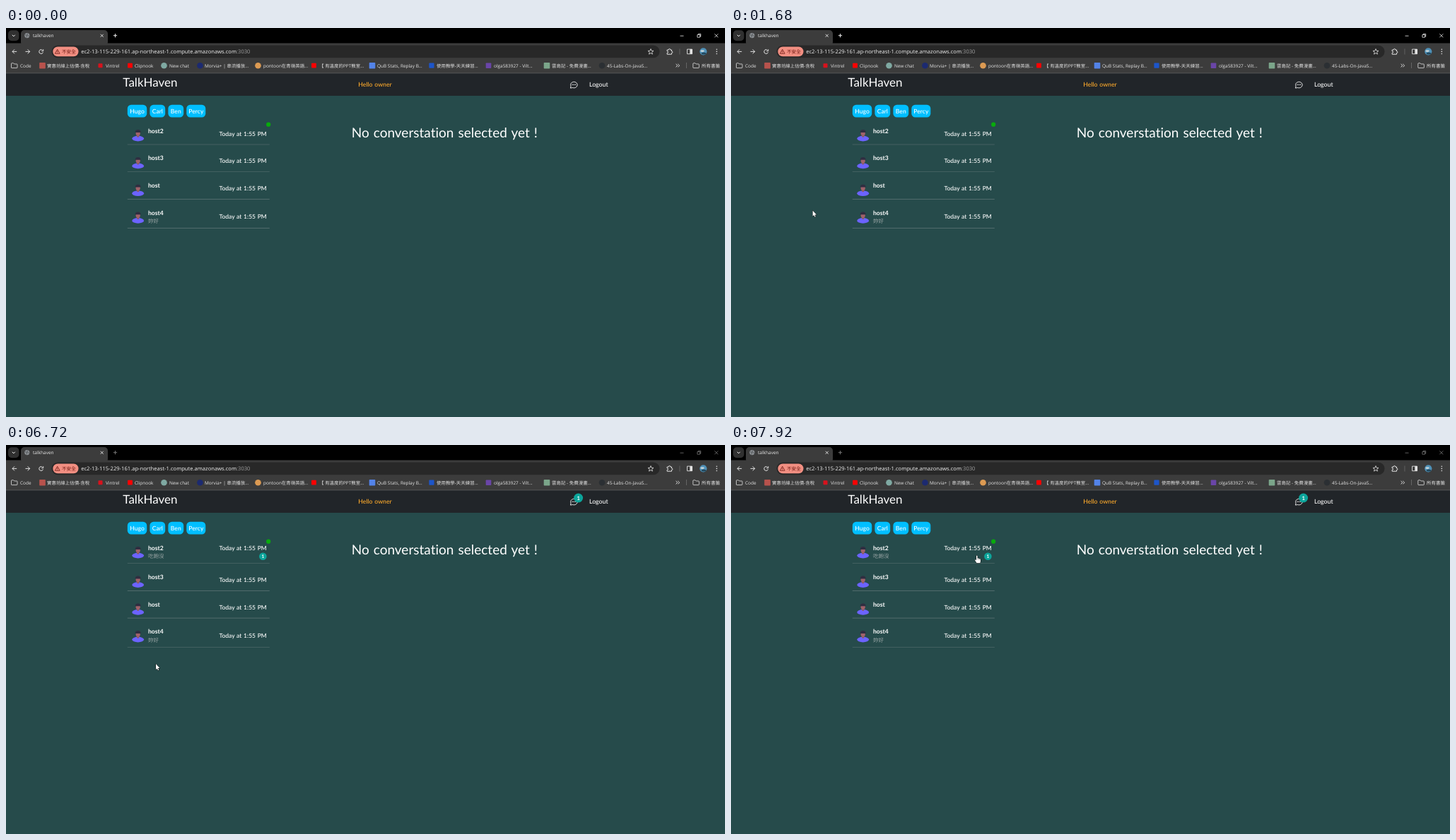
Animation, 1017 px wide and 551 px high, one loop 8000 ms. Source, as an HTML page with a canvas:

```html
<!DOCTYPE html>
<html lang="zh-Hant">
<head>
<meta charset="utf-8">
<title>talkhaven</title>
<style>
  html, body { margin: 0; width: 100%; height: 100%; overflow: hidden; background: #264b4b; }
  canvas { display: block; width: 1017px; height: 551px; }
</style>
</head>
<body>
<canvas id="stage"></canvas>
<script>
const W = 1017, H = 551, LOOP = 8000;
const UI = '"Open Sans", "Noto Sans CJK TC", "Noto Sans CJK", sans-serif';
const PAGE = 'Lato, "Noto Sans CJK TC", "Noto Sans CJK", sans-serif';
const BAR = '#3c3c3c', ICON = '#e3e3e3';

const stage = document.getElementById('stage');
const dpr = window.devicePixelRatio || 1;
stage.width = W * dpr;
stage.height = H * dpr;
const c = stage.getContext('2d');
c.scale(dpr, dpr);
c.textRendering = 'geometricPrecision';
c.letterSpacing = '0.01px'; // turns ligatures off

// ---- drawing helpers ----
function rect(x, y, w, h, color, r = 0) {
  c.fillStyle = color;
  c.beginPath();
  c.roundRect(x, y, w, h, r);
  c.fill();
}
function disc(x, y, r, color, ry = r) {
  c.fillStyle = color;
  c.beginPath();
  c.ellipse(x, y, r, ry, 0, 0, Math.PI * 2);
  c.fill();
}
function ring(x, y, r, color, from = 0, to = Math.PI * 2, width = 0.8) {
  c.strokeStyle = color;
  c.lineWidth = width;
  c.beginPath();
  c.arc(x, y, r, from, to);
  c.stroke();
}
function stroke(d, x, y, color, width = 0.9) {
  c.save();
  c.translate(x, y);
  c.strokeStyle = color;
  c.lineWidth = width;
  c.stroke(new Path2D(d));
  c.restore();
}
function text(s, x, y, size, color, font = PAGE, { weight = 400, align = 'left' } = {}) {
  c.font = `${weight} ${size}px ${font}`;
  c.wordSpacing = font === PAGE ? size * 0.06 + 'px' : '0px';
  c.textAlign = align;
  c.fillStyle = color;
  c.fillText(s, x, y);
}

// ---- browser ----
const marks = [
  [51.5, '#b8524c', 'square', 58, '實惠坊線上估價-含稅'],
  [133.5, '#d8121c', 'square', 141, 'Vintrel', 3],
  [175.5, '#f00', 'square', 182, 'Clipnook', 3.4],
  [223.5, '#7fa9a2', 'circle', 231, 'New chat'],
  [274.5, '#1c2a70', 'circle', 281, 'Morvia+ | 串流播放...'],
  [356.5, '#dc9a52', 'circle', 364, 'pontoon在青嶺英語...'],
  [435.5, '#f00', 'square', 443, '【 有溫度的PPT教室...', 3.4],
  [518, '#5383e8', 'square', 525, 'QuB Stats, Replay B...'],
  [602, '#1d55c9', 'square', 609, '使用教學-天天練習...', 3.6],
  [682.5, '#6a45a8', 'square', 690, 'olga583927 - Vilt...', 3.8],
  [765, '#7ba58a', 'square', 772, '雲島記 - 免費漫畫...'],
  [843, '#2b2f33', 'circle', 850, '45-Labs-On-JavaS...']
];

function folder(x, y) {
  stroke('M.5 1.5Q.5.8 1.2.8H3.6L4.8 2H8.2Q9 2 9 2.7V7Q9 7.6 8.2 7.6H1.2Q.5 7.6.5 7Z', x, y, ICON, 0.8);
}

function tabStrip(active) {
  const edge = active ? '#eee' : '#777';
  rect(0, 0, W, 22, '#000');
  rect(3, 3.3, 15.5, 15, '#303030', 5);
  stroke('M-2 -1L0 1L2 -1', 10.8, 10.8, '#fff', 1);
  rect(21, 3, 123, 22, BAR, 5);
  disc(29.8, 10.6, 3.6, '#8b8f93');
  stroke('M-3 -1L0 0L-1 3M1 -3L0 -1L3 1', 29.8, 10.6, '#4a4d50', 0.8);
  text('talkhaven', 38, 13.2, 6.5, '#e8e8e8', UI);
  stroke('M-2 -2L2 2M2 -2L-2 2', 135.7, 10.8, '#e8e8e8');
  stroke('M-2.6 0H2.6M0 -2.6V2.6', 154.5, 10.7, edge, 1);
  stroke('M-2.5 0H2.5', 956, 11.2, edge, 0.8);
  stroke('M-2.4 -1.2H1.2V2.4H-2.4ZM-1.2 -1.4V-2.4H2.4V1.2H1.4', 980.3, 10.8, edge, 0.8);
  stroke('M-2.5 -2.5L2.5 2.5M2.5 -2.5L-2.5 2.5', 1004.8, 10.8, edge, 0.8);
}

function toolbar() {
  rect(0, 21.6, W, 43, BAR);
  stroke('M3.2 0H-3M0 -3L-3 0L0 3', 12, 33.4, ICON, 1);
  stroke('M-3.2 0H3M0 -3L3 0L0 3', 30.7, 33.4, ICON, 1);
  ring(49.7, 33.5, 2.9, ICON, 0.3, 5.4, 1);
  stroke('M3 -3.3V-.8H.5', 49.7, 33.5, ICON, 1);

  rect(64.5, 24.5, 860, 17.8, '#282828', 8.9);
  rect(66.3, 26.6, 36.2, 13.6, '#f28f82', 6.8);
  stroke('M0 -3L3.4 3H-3.4ZM0 -.9V1.1M0 1.6V2.3', 72.7, 33.2, '#701a14', 0.8);
  text('不安全', 79, 36, 6.6, '#701a14', UI);
  const host = 'ec2-13-115-229-161.ap-northeast-1.compute.amazonaws.com';
  text(host, 106.2, 36, 7.6, '#f1f1f1', UI);
  text(':3030', 106.2 + c.measureText(host).width, 36, 7.6, '#a0a0a0', UI);

  let star = '';
  for (let i = 0; i < 10; i++) {
    const r = i % 2 ? 1.8 : 4.2, a = i * Math.PI / 5;
    star += (i ? 'L' : 'M') + r * Math.sin(a) + ' ' + -r * Math.cos(a);
  }
  stroke(star + 'Z', 912, 33.7, ICON, 0.8);
  stroke('M-3.4 -2.4H-1.2Q-1.2 -4 0 -4T1.2 -2.4H3V-.4Q4.4 -.4 4.4 .8T3 2V3.8H-3.4V2Q-2 2 -2 .7T-3.4 -.6Z', 938.5, 33.4, ICON, 1);
  rect(952.6, 29.5, 0.7, 8, '#707070');
  stroke('M-3.5 -3.3H3.5V3.3H-3.5Z', 967, 33.4, ICON, 0.9);
  rect(967.3, 30, 3.4, 6.8, ICON);
  disc(986.3, 33.3, 5.1, '#4f91b8');
  disc(985, 32.6, 2.8, '#c9d6d8', 1.3);
  disc(987, 36, 3.3, '#23495e', 1.5);
  for (const y of [30.3, 33.4, 36.5]) disc(1005.3, y, 0.8, ICON);

  folder(7, 49);
  text('Code', 20, 55.6, 6.45, ICON, UI);
  for (const [x, color, kind, tx, label, half = 4.3] of marks) {
    if (kind === 'circle') disc(x, 53.2, half, color);
    else rect(x - half, 53.2 - half, half * 2, half * 2, color, 0.8);
    text(label, tx, 55.6, 6.45, ICON, UI);
  }
  stroke('M-2.4 -2.2L-.2 0L-2.4 2.2M.4 -2.2L2.6 0L.4 2.2', 950, 53.2, ICON, 1);
  rect(962, 49, 0.7, 8, '#777');
  folder(971.3, 49);
  text('所有書籤', 984, 55.6, 6.5, ICON, UI);
  rect(0, 63.6, W, 0.8, '#5b5d5f');
}

// ---- chat page ----
function badge(x, y, r, size) {
  disc(x, y, r, '#0ca59b');
  text('1', x, y + size * 0.36, size, '#fff', PAGE, { weight: 700, align: 'center' });
}

function navbar(unread) {
  rect(0, 64.4, W, 31.6, '#212529');
  text('TalkHaven', 165.3, 83.4, 17, '#fff');
  text('Hello owner', 498.3, 82.9, 8.7, '#ffab2b', PAGE, { weight: 500 });
  stroke('M-4.6 4.6L-4 1.9A4.8 4.3 0 1 1 -1.6 4Z', 803, 80.5, '#fff', 0.85);
  for (const dx of [-2, 0.2, 2.4]) disc(803 + dx, 80.3, 0.7, '#fff');
  text('Logout', 825, 82.9, 8.7, '#fff', PAGE, { weight: 500 });
  if (unread) badge(809.6, 75, 6.5, 7.6);
}

function avatar(x, y) {
  disc(x, y + 4.9, 8.4, '#6c63ff', 3.8);
  rect(x - 1.5, y - 1, 3, 4, '#8e5a5d', 1.5);
  disc(x, y - 2.8, 3.1, '#a0616a', 4);
  c.fillStyle = '#2f2e41';
  c.beginPath();
  c.ellipse(x, y - 3.8, 4, 3.8, 0, Math.PI, 0);
  c.fill();
}

const rows = [
  { name: 'host2', y: 145.5, at: 149.5, pic: 151.7, line: 165 },
  { name: 'host3', y: 184.2, at: 188.2, pic: 190.5, line: 203.7 },
  { name: 'host', y: 222.9, at: 226.9, pic: 229.3, line: 242.4 },
  { name: 'host4', y: 261.6, at: 267.2, pic: 268, line: 283.6, note: '妳好' }
];

// phase 0: quiet, 1: unread badge, 2: badge and message preview
function chatList(phase) {
  const shift = [0, 2, 2.7][phase];
  rows.forEach((row, i) => {
    const first = i === 0;
    const dy = first ? [0, 1, 0][phase] : shift;
    const note = first && phase === 2 ? '吃飽沒' : row.note;
    const at = first && phase ? 145.2 + (phase - 1) * 0.6 : row.at + dy;
    avatar(186.7, row.pic + dy);
    text(row.name, 201, row.y + dy + 3, 8.6, '#fff', PAGE, { weight: 700 });
    if (note) text(note, 201, row.y + dy + 14.4, 7.45, '#98a4a4');
    text('Today at 1:55 PM', 368.8, at + 3.1, 8.5, '#fff', PAGE, { weight: 500, align: 'right' });
    rect(171.8, row.line + shift - 0.3, 201, 0.6, '#5f7677');
  });
  if (phase) badge(363.4, 156.7 + phase * 0.5, 5.3, 6.6);
  disc(371.2, 136.7, 3.1, '#08ab0c');
}

const chips = [['Hugo', 171.8, 27.4], ['Carl', 203.4, 21.8], ['Ben', 229.4, 21.8], ['Percy', 255.3, 27]];

function page(phase) {
  rect(0, 96, W, H - 96, '#264b4b');
  navbar(phase > 0);
  for (const [name, x, w] of chips) {
    rect(x, 108.8, w, 17.8, '#00bfff', 5.3);
    text(name, x + w / 2, 120.7, 8.6, '#fff', PAGE, { weight: 500, align: 'center' });
  }
  chatList(phase);
  text('No converstation selected yet !', 488.7, 155.4, 19, '#fff');
}

// ---- pointer ----
const ARROW = new Path2D('M0 0V8.2L1.8 6.6L3 9.3L4.2 8.8L3 6.1H5.5Z');
const HAND = new Path2D('M-.8 .8Q-.8 0 0 0T.8 .8V4Q2 3.3 2.4 4.3Q3.6 3.8 3.9 4.9Q5.2 4.6 5.2 6V8Q5.2 9.6 4.4 10.8H-.2Q-.7 9.6 -2.4 7.4Q-3.2 6.2 -2.4 5.9T-.8 7Z');

// [start, step length, last step, end, points of a Bezier curve]
const moves = [
  [510, 77.8, 9, 1380, [[46, 407], [677, 330], [677, 90], [382, 145]]],
  [1380, 75, 5, 1830, [[377, 143], [300, 190], [7, 300]]],
  [6640, 80, 0, 6720, [[17, 375]]],
  [6720, 78.75, 8, 7430, [[212, 310], [310, 235], [299, 123]]],
  [7430, 90, 0, 7520, [[302, 138]]],
  [7520, 400, 0, 7920, [[308, 153]]],
  [7920, 80, 0, 8000, [[347.8, 156.5]]]
];

function bezier(pts, u) {
  while (pts.length > 1) {
    pts = pts.slice(1).map(([x, y], i) => [pts[i][0] + (x - pts[i][0]) * u, pts[i][1] + (y - pts[i][1]) * u]);
  }
  return pts[0];
}

function pointer(ms, phase) {
  const move = moves.find(m => ms >= m[0] && ms < m[3]);
  if (!move) return;
  const [start, step, last, , pts] = move;
  const k = Math.min(last, Math.floor((ms - start) / step + 0.01));
  const [x, y] = bezier(pts, last ? k / last : 0);
  const onChip = y > 109 && y < 126 && chips.some(([, cx, w]) => x > cx && x < cx + w);
  const onRow = x > 172 && x < 373 && y > 134 && y < 284 + (phase ? 2 : 0);
  const shape = onChip || onRow ? HAND : ARROW;
  c.save();
  c.translate(x, y);
  c.lineWidth = 0.9;
  c.strokeStyle = '#000';
  c.fillStyle = '#fff';
  c.stroke(shape);
  c.fill(shape);
  if (shape === HAND) stroke('M.8 4V6M2.4 4.5V6.2M3.9 5V6.4', 0, 0, '#444', 0.4);
  c.restore();
}

function draw(now) {
  const ms = now % LOOP;
  const phase = ms < 6560 ? 0 : ms < 6640 ? 1 : 2;
  tabStrip(ms < 2240);
  toolbar();
  page(phase);
  pointer(ms, phase);
}

let begin;
function tick(now) {
  begin ??= now;
  draw(now - begin);
  requestAnimationFrame(tick);
}
draw(0);
requestAnimationFrame(tick);
</script>
</body>
</html>
```
